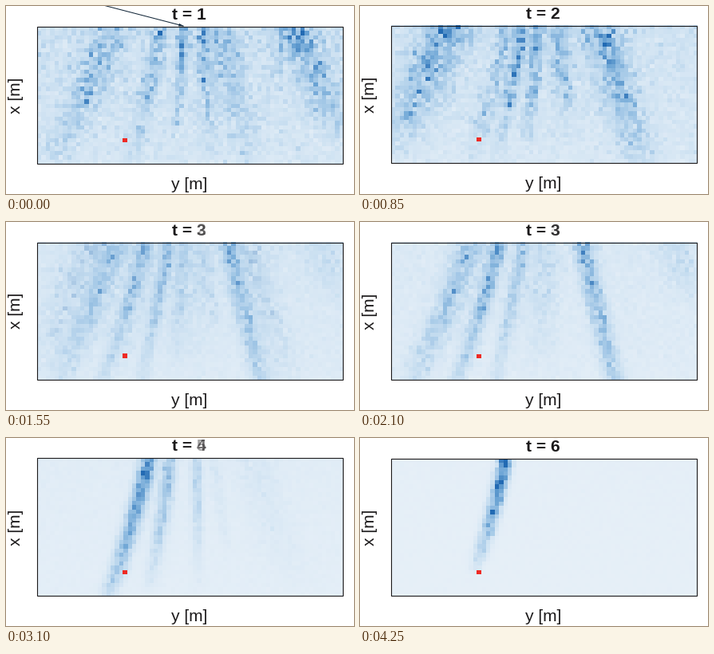
A matplotlib script for the animation above (6250 ms loop, 436 px wide and 236 px high).

```python
import numpy as np
import matplotlib.pyplot as plt
from matplotlib.animation import FuncAnimation
from matplotlib.colors import LinearSegmentedColormap
from matplotlib.patches import Polygon, Rectangle

W, H, DPI = 436, 236, 100
COLS, ROWS = 71, 32
LEFT, RIGHT, FLOOR = 38.5, 421.5, 198
TARGET_COL, TARGET_ROW = 20, 26
HOLD, FADE, STEP_MS = 7, 10, 50
FONT_PX = 21
INK, NAVY = "#1c1a1b", "#14283a"

cmap = LinearSegmentedColormap.from_list(
    "beams", ["#e7f0f8", "#c9dff1", "#a0c6e6", "#6da5d5", "#226ab3"])


def heatmap(seed, base, *streaks):
    """RGB cells; a streak is x at the top, width, strength and reach."""
    rng = np.random.default_rng(seed)
    u = ((np.arange(ROWS) + 0.5) / ROWS)[:, None]
    x = LEFT + (np.arange(COLS)[None, :] + 0.5) * (RIGHT - LEFT) / COLS
    level = base * (1.2 - 0.5 * u) + 0 * x
    for x0, width, gain, reach in streaks:
        # Streaks lean away from the middle
        path = x0 + 93 * np.tanh((x0 - 235) / 95) * u ** 1.2
        fall = np.clip(1 - (u / reach) ** 2, 0, 1)
        level += gain * fall * np.exp(-0.5 * ((x - path) / width) ** 2)
    level *= rng.gamma(24 - 70 * base, 1, level.shape) / (24 - 70 * base)
    return cmap(np.clip(level, 0, 1))[..., :3]


maps = [
    heatmap(41, 0.20, (132, 15, .30, 1.2), (193, 7, .36, 1.1), (222, 4, .42, .8),
            (246, 8, .26, 1), (270, 12, .26, 1.1), (360, 19, .40, .9)),
    heatmap(42, 0.17, (110, 20, .48, 1), (184, 8, .28, 1.1), (202, 5, .58, 1),
            (221, 6, .48, .9), (248, 10, .30, .8), (300, 16, .44, 1.2)),
    heatmap(43, 0.09, (138, 13, .42, 1.3), (173, 7, .54, 1.2), (201, 6, .32, 1.3),
            (228, 14, .16, 1), (279, 8.5, .54, 1.7), (392, 18, .17, .5)),
    heatmap(44, 0.05, (177, 7, .78, 1.2), (205, 6, .58, 1),
            (237, 5, .24, 1), (308, 18, .12, 1)),
    heatmap(45, 0.03, (179, 7.5, .82, 1.15), (206, 8, .16, 1),
            (238, 4, .40, .75), (260, 5, .21, .75)),
    heatmap(46, 0.015, (181, 6, .94, .85)),
]
tops = [26, 24.5, 26, 25.5, 24.5, 26]
LAST = len(maps) - 1

plt.rcParams["font.family"] = "Liberation Sans"
fig = plt.figure(figsize=(W / DPI, H / DPI), dpi=DPI, facecolor="white")
ax = fig.add_axes([0, 0, 1, 1])
ax.axis("off")
image = ax.imshow(maps[0], extent=(LEFT, RIGHT, FLOOR, tops[0]), aspect="auto",
                  interpolation="nearest")
ax.set_xlim(0, W)
ax.set_ylim(H, 0)


def label(x, y, s, **kw):
    return ax.text(x, y, s, size=FONT_PX * 72 / DPI, color=INK,
                   va="baseline", **kw)


prefix = label(207.5, 17, "t =", weight="bold")
old_digit = label(238.4, 17, "1", weight="bold")
new_digit = label(238.4, 17, "2", weight="bold")
x_label = label(18.3, 112, "x [m]", ha="center", rotation=90, rotation_mode="anchor")
y_label = label(229.7, 230, "y [m]", ha="center")

cell = ax.add_patch(Rectangle((0, 0), 1, 1, fc="#ee2a24", ec="none"))
frame = ax.add_patch(Rectangle((LEFT, tops[0]), RIGHT - LEFT, FLOOR - tops[0],
                               fill=False, ec=INK, lw=0.8))
shaft, = ax.plot([120, 222], [-1.5, 25], color=NAVY, lw=0.75)
head = ax.add_patch(Polygon([(223, 25.4), (216, 25.4), (217, 21.9)],
                            fc=NAVY, ec="none"))


def bottom_of(state):
    return FLOOR - 1 if state == 1 else FLOOR


def draw(i):
    steps = sum(min(max(i - HOLD - (HOLD + FADE) * s, 0), FADE) for s in range(LAST))
    now, part = divmod(steps, FADE)
    nxt, a = min(now + 1, LAST), part / FADE

    def mix(p, q):
        return p + (q - p) * a

    top = mix(tops[now], tops[nxt])
    bottom = mix(bottom_of(now), bottom_of(nxt))
    image.set_data(mix(maps[now], maps[nxt]))
    image.set_extent((LEFT, RIGHT, bottom, top))
    frame.set_y(top)
    frame.set_height(bottom - top)

    dx, dy = (RIGHT - LEFT) / COLS, (bottom - top) / ROWS
    cell.set_bounds(LEFT + TARGET_COL * dx, top + TARGET_ROW * dy, dx, dy)

    prefix.set_y(top - 9)
    old_digit.set(text=str(now + 1), y=tops[now] - 9, alpha=1 - a)
    new_digit.set(text=str(nxt + 1), y=tops[nxt] - 9, alpha=a if nxt > now else 0)
    x_label.set_y(112 + bottom - FLOOR)
    y_label.set_y(230 + bottom - FLOOR)
    for artist in (shaft, head):
        artist.set_alpha(1 - a if now == 0 else 0)
    return []


anim = FuncAnimation(fig, draw, frames=125, interval=STEP_MS, repeat=True,
                     repeat_delay=0, blit=False)
plt.show()
```
